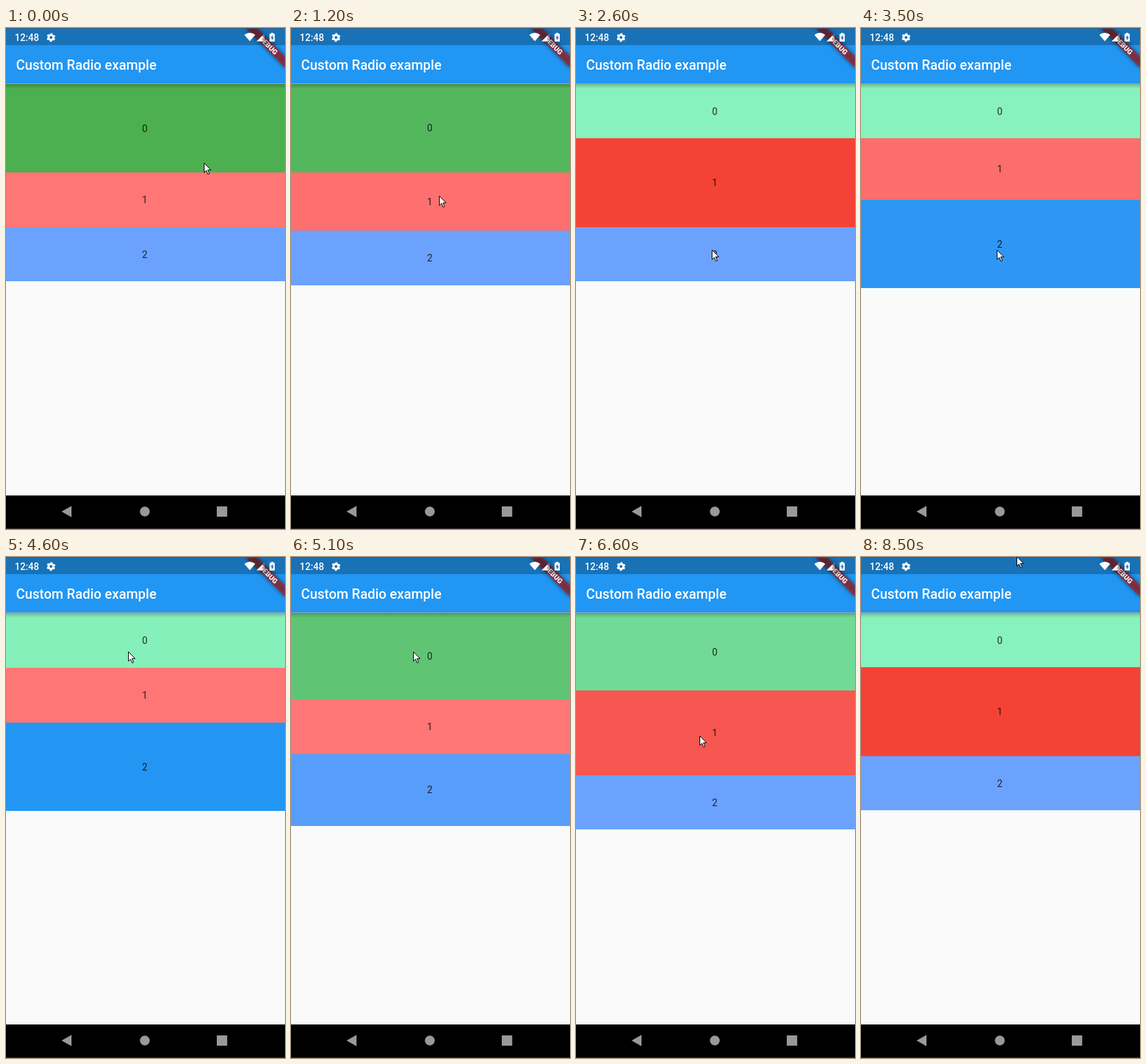
Write an HTML page that moves like this. It is 409x732 px and loops after 8.55 s.

```html
<!DOCTYPE html>
<html lang="en">
<head>
<meta charset="utf-8">
<title>Custom Radio example</title>
<style>
  html, body { margin: 0; width: 100%; height: 100%; overflow: hidden; background: #fafafa; }
  svg { display: block; width: 100vw; height: 100vh; font-family: Roboto, sans-serif; }
</style>
</head>
<body>
<svg viewBox="0 0 409 732">
  <defs>
    <linearGradient id="shade" x2="0" y2="1">
      <stop offset="0" stop-opacity=".36"/>
      <stop offset=".35" stop-opacity=".15"/>
      <stop offset="1" stop-opacity="0"/>
    </linearGradient>
    <filter id="blur" x="-20%" y="-100%" width="140%" height="300%">
      <feGaussianBlur stdDeviation="3"/>
    </filter>
  </defs>
  <rect width="409" height="732" fill="#fafafa"/>
  <g id="rows" font-size="14" text-anchor="middle"></g>

  <!-- app bar -->
  <rect y="81" width="409" height="8" fill="url(#shade)"/>
  <rect width="409" height="81" fill="#2196f3"/>
  <text x="14.8" y="61" font-size="19.9" font-weight="500" fill="#fff">Custom Radio example</text>

  <!-- debug ribbon -->
  <g transform="translate(409 1.6) rotate(45)">
    <rect x="-40" y="28" width="80" height="12" opacity=".5" filter="url(#blur)"/>
    <rect x="-40" y="28" width="80" height="12" fill="#b71c1c" fill-opacity=".63"/>
    <text y="37.6" font-size="10.2" font-weight="900" text-anchor="middle" fill="#fff">DEBUG</text>
  </g>

  <!-- status bar -->
  <rect width="409" height="25" fill-opacity=".25"/>
  <rect width="409" height="1" fill="#3a5f80"/>
  <g fill="#fff">
    <text x="12.8" y="19" font-size="14" font-weight="500">12:48</text>
    <g fill="none" stroke="#fff">
      <circle cx="66" cy="13.8" r="3.6" stroke-width="3"/>
      <circle cx="66" cy="13.8" r="5.4" stroke-width="2" stroke-dasharray="2.8 2.855" stroke-dashoffset="4.23"/>
    </g>
    <path d="M357.4 19.3 349.4 10Q357.4 4 365.4 10Z"/>
    <path d="M367.3 19.6 379 8V19.6Z" opacity=".3"/>
    <path d="M367.3 19.6 376 11V19.6Z"/>
    <path d="M388.7 7h3v1.4h2.3v11.4h-7.6V8.4h2.3z"/>
    <path d="M390.9 10.2 387.8 14.8h1.9v3.6l3.1-4.8h-1.9z" fill="#1971b6"/>
  </g>

  <!-- navigation bar -->
  <rect y="683" width="409" height="49"/>
  <rect y="731" width="409" height="1" fill="#3a2a2e"/>
  <g fill="#999">
    <path d="M81.5 706.5 96 698.2V714.8Z"/>
    <circle cx="203.5" cy="706.5" r="7.2"/>
    <rect x="309" y="699" width="15.3" height="15"/>
  </g>

  <path id="cursor" d="M.5.5V14.2L3.7 11.2 6 16.7 8.1 15.8 5.8 10.4H10.2Z" fill="#fff" stroke="#000"/>
</svg>
<script>
const LOOP = 8550, STEP = 50, FADE = 750;
const TOP = 81.6, SMALL = 79.6, GROW = 49.8, IDLE_ALPHA = 200 / 255;

// idle and selected colour of each row
const COLORS = [['69f0ae', '4caf50'], ['ff5252', 'f44336'], ['448aff', '2196f3']]
  .map(pair => pair.map(hex => hex.match(/../g).map(h => parseInt(h, 16))));

// each tap selects the next row in turn
const TAPS = [1115, 2870, 4573, 6147];

// pointer moves along quadratic curves
const HOME = [290, 197];
const MOVES = [
  { from: 150, until: 1000, to: [217, 245], bend: [338, 98] },
  { from: 1850, until: 2600, to: [199, 324] },
  { from: 3620, until: 4550, to: [179, 138] },
  { from: 5340, until: 6100, to: [181, 261], bend: [184, 165] },
  { from: 6850, until: 7200, to: [300, 177] },
  { from: 7550, until: 8400, to: [269, 4], bend: [440, 90] },
  { from: 8499, until: 8500, to: [228, -1] }
];

const clamp = x => Math.max(0, Math.min(1, x));
const mix = (a, b, k) => a + (b - a) * k;
const bezier = (s, a, b) => 3 * (1 - s) ** 2 * s * a + 3 * (1 - s) * s * s * b + s ** 3;

// cubic-bezier(.25, .1, .25, 1)
function ease(x) {
  let lo = 0, hi = 1;
  for (let i = 0; i < 24; i++) {
    const mid = (lo + hi) / 2;
    if (bezier(mid, .25, .25) < x) lo = mid; else hi = mid;
  }
  return bezier(lo, .1, 1);
}

function set(el, attrs) {
  for (const key in attrs) el.setAttribute(key, attrs[key]);
}

function add(parent, tag, attrs) {
  const el = document.createElementNS(parent.namespaceURI, tag);
  set(el, attrs);
  return parent.appendChild(el);
}

const list = document.getElementById('rows');
const cursor = document.getElementById('cursor');
const rows = COLORS.map((_, i) => {
  const box = add(list, 'rect', { width: 409, 'shape-rendering': 'crispEdges' });
  const label = add(list, 'text', { x: 203.5, 'fill-opacity': .8 });
  label.textContent = i;
  return { box, label };
});

function levels(t) {
  const level = [1, 0, 0];
  TAPS.forEach((start, n) => {
    if (t < start) return;
    const p = clamp((t - start) / FADE);
    level[n % 3] = 1 - p;
    level[(n + 1) % 3] = p;
  });
  return level;
}

function pointer(t) {
  let at = HOME;
  for (const { from, until, to, bend } of MOVES) {
    const k = clamp((t - from) / (until - from));
    at = at.map((a, i) => {
      const c = bend ? bend[i] : (a + to[i]) / 2;
      return mix(mix(a, c, k), mix(c, to[i], k), k);
    });
    if (k < 1) break;
  }
  return at.map(Math.round);
}

function draw(time) {
  const t = Math.floor(time % LOOP / STEP) * STEP;
  let y = TOP;
  levels(t).forEach((level, i) => {
    const { box, label } = rows[i], [idle, active] = COLORS[i];
    const next = y + SMALL + GROW * ease(level);
    const top = Math.round(y), height = Math.round(next) - top;
    const rgb = idle.map((c, n) => Math.round(mix(c, active[n], level)));
    set(box, { y: top, height, fill: `rgb(${rgb})`, 'fill-opacity': mix(IDLE_ALPHA, 1, level) });
    set(label, { y: (y + next) / 2 + 5.3 });
    y = next;
  });
  set(cursor, { transform: `translate(${pointer(t)})` });
}

const begin = performance.now();
function tick() {
  draw(performance.now() - begin);
  requestAnimationFrame(tick);
}
tick();
</script>
</body>
</html>
```
